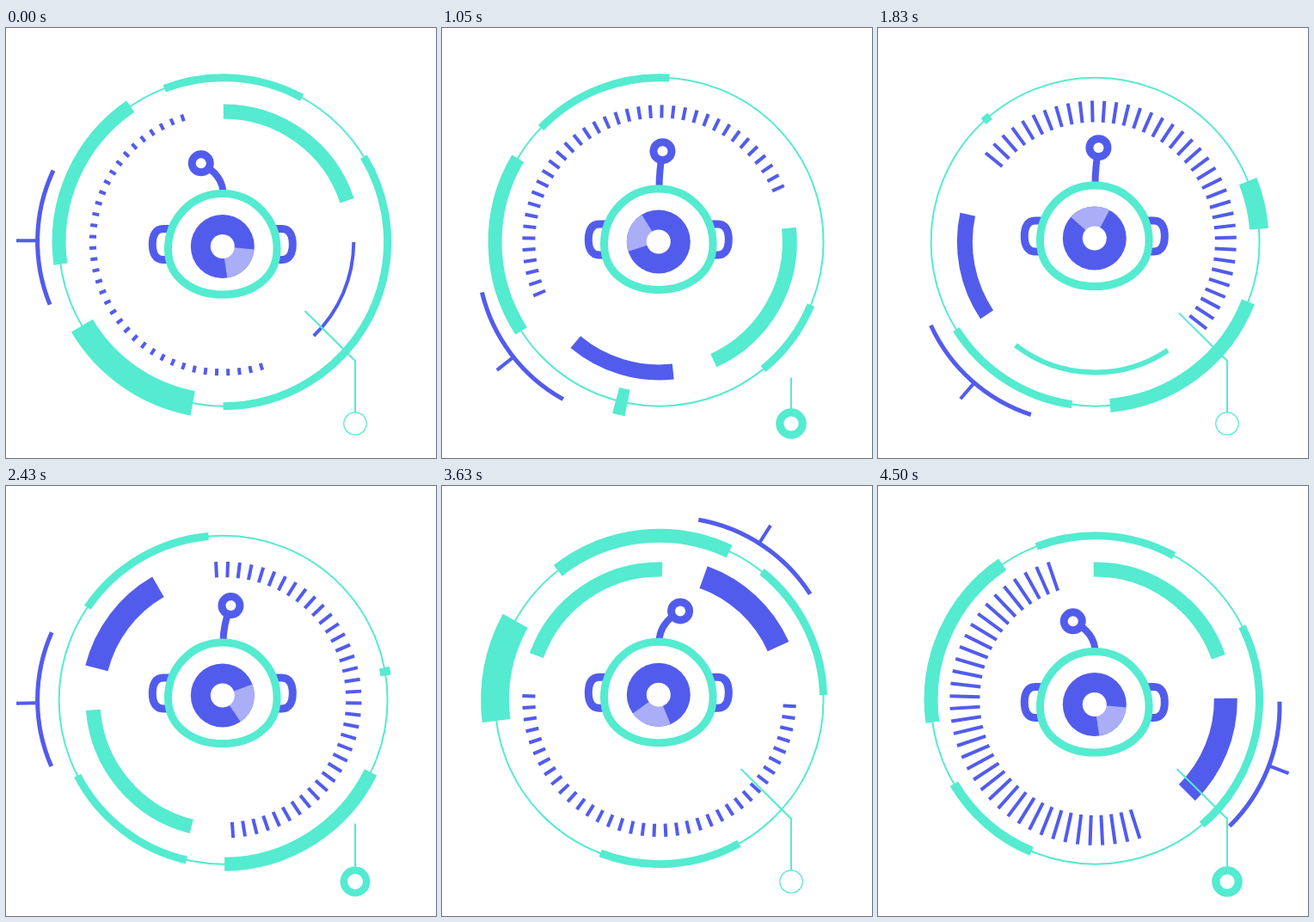
An HTML page with a canvas for the animation above (4.53 s loop, 500 by 500 pixels).

```html
<!DOCTYPE html>
<html lang="en">
<head>
<meta charset="utf-8">
<title>Robot dial</title>
<style>
  html, body { margin: 0; width: 100%; height: 100%; overflow: hidden; background: #fff; }
  canvas { display: block; width: 500px; height: 500px; }
</style>
</head>
<body>
<canvas id="stage" width="500" height="500"></canvas>
<script>
const LOOP = 4530, FULL_TURN = 4510;
const TEAL = '#54ebd0', BLUE = '#525cec', PALE = '#a9aef6';
const CX = 252.6, CY = 248.7, HEAD_X = 251.8;
const RING = 191, DIAL = 151.7, TICKS = 37;
const ctx = document.getElementById('stage').getContext('2d');
const rad = deg => deg * Math.PI / 180;

const smooth = u => u * u * (3 - 2 * u);
// Long rest at both ends, quick change a little after the middle.
const snap = u => u ** 3.3 / (u ** 3.3 + 1.9 * (1 - u) ** 3.3);

const between = (t, t0, t1, a, b) => a + (b - a) * smooth((t - t0) / (t1 - t0));

// Snaps from value to value on an even beat.
const beats = (ms, ...values) => t => {
  const last = values.length - 1;
  const i = Math.min(Math.floor(t / ms), last - 1);
  const u = Math.min(t / ms - i, 1);
  return values[i] + (values[i + 1] - values[i]) * snap(u);
};

// Slow beat: whole-body motion.
const SLOW = 900;
const ringTurn = beats(SLOW, 0, -24.7, -150.8, -145.5, 59.7, 0);
const eyeTurn = beats(SLOW, 43.5, 200, 260, 391, 826, 763.5);
const bob = beats(SLOW, 0, -5.5, -9.5, -10.6, -11.3, 0);
const tealWidth = beats(SLOW, 17, 17, 6, 18, 17, 17);
const blueWidth = beats(SLOW, 4, 18, 18, 28, 27, 27);
const leadLength = beats(SLOW, 143, 40, 139, 45, 143, 143);
const pulse = beats(SLOW, 0, 1, 0, 1, 0, 1);

// Fast beat: trims, ticks and antenna.
const FAST = 750;
const sway = beats(FAST, -38, 6, 4, 13, -10, 37, -38);
const tickLength = beats(FAST, 8, 13.4, 26.7, 18, 37, 15, 35);
const wideWidth = beats(FAST, 29, 32, 24.4, 12, 29, 33, 11);
const wideFrom = beats(FAST, 100.7, 126, 127.7, 135, 113, 113, 112.8);
const wideTo = beats(FAST, 149.3, 127.8, 148.4, 137.4, 149.1, 149.1, 149.3);
const slimFrom = beats(FAST, -31.2, 51.2, 22.2, 0.5, -19.8, 1.4, -26.6);
const slimTo = beats(FAST, 90, 84.5, 13.7, 50.5, 85.5, 51, 49.5);

// The outer pointer swings slowly and is cut halfway through a swing.
function orbitTurn(t) {
  if (t < 1800) return between(t, -1800, 1800, 231.4, 131.6);
  if (t < 3600) return between(t, 1800, 3600, 131.6, 303.5);
  return between(t, 3600, 5400, 303.5, 460);
}

function stroke(color, width) {
  ctx.strokeStyle = color;
  ctx.lineWidth = width;
  ctx.stroke();
}

function arc(r, a, b, color, width, x = 0) {
  ctx.beginPath();
  ctx.arc(x, 0, r, rad(Math.min(a, b)), rad(Math.max(a, b)));
  stroke(color, width);
}

function spoke(deg, r0, r1) {
  const c = Math.cos(rad(deg)), s = Math.sin(rad(deg));
  ctx.beginPath();
  ctx.moveTo(c * r0, s * r0);
  ctx.lineTo(c * r1, s * r1);
  stroke(BLUE, 4);
}

function disc(x, y, r, color) {
  ctx.beginPath();
  ctx.arc(x, y, r, 0, 2 * Math.PI);
  ctx.fillStyle = color;
  ctx.fill();
}

function turned(deg, draw) {
  ctx.save();
  ctx.rotate(rad(deg));
  draw();
  ctx.restore();
}

function drawDials(t) {
  ctx.save();
  ctx.translate(CX, CY);
  arc(RING, 0, 360, TEAL, 2);
  turned(ringTurn(t), () => {
    arc(RING, 249, 298.6, TEAL, 9);
    arc(RING, 172.2, 235.6, TEAL, 16);
    arc(RING, wideFrom(t), wideTo(t), TEAL, wideWidth(t));
    arc(RING, slimFrom(t), slimTo(t), TEAL, 9);
  });
  turned(360 * t / FULL_TURN, () => {
    arc(DIAL, -90, -18.5, TEAL, tealWidth(t));
    arc(DIAL, 0, 46, BLUE, blueWidth(t));
    const half = tickLength(t) / 2;
    for (let i = 0; i < TICKS; i++) spoke(72.9 + i * 4.97, DIAL - half, DIAL + half);
  });
  turned(orbitTurn(t), () => {
    arc(194, -23.7, 23.7, BLUE, 5, 22);
    spoke(-1.1, 216, 240.6);
  });
  ctx.restore();
}

function drawEar(side) {
  ctx.save();
  ctx.scale(side, 1);
  ctx.beginPath();
  ctx.moveTo(61, 233.5);
  ctx.lineTo(69, 233.5);
  ctx.bezierCurveTo(78, 233.5, 81.5, 241, 81.5, 251.5);
  ctx.bezierCurveTo(81.5, 262, 78, 269.5, 69, 269.5);
  ctx.lineTo(61, 269.5);
  stroke(BLUE, 9);
  ctx.restore();
}

function drawAntenna(angle) {
  const x = 0.5 + 41.5 * Math.sin(angle), y = 190 - 41.5 * Math.cos(angle);
  ctx.beginPath();
  ctx.moveTo(0.7, 193);
  ctx.quadraticCurveTo(0.7, 171, x, y);
  stroke(BLUE, 8);
  disc(x, y, 15, BLUE);
  disc(x, y, 6, '#fff');
}

function drawFace() {
  ctx.beginPath();
  ctx.moveTo(0, 192.5);
  ctx.bezierCurveTo(36, 192.5, 63.3, 222, 63.3, 257);
  ctx.bezierCurveTo(63.3, 293, 31, 310, 0, 310);
  ctx.bezierCurveTo(-31, 310, -63.3, 293, -63.3, 257);
  ctx.bezierCurveTo(-63.3, 222, -36, 192.5, 0, 192.5);
  ctx.closePath();
  ctx.fillStyle = '#fff';
  ctx.fill();
  stroke(TEAL, 9);
}

function drawEye(turn) {
  disc(0, 254, 37, BLUE);
  ctx.beginPath();
  ctx.moveTo(0, 254);
  ctx.arc(0, 254, 37, rad(turn - 38), rad(turn + 38));
  ctx.fillStyle = PALE;
  ctx.fill();
  disc(0, 254, 14, '#fff');
}

function drawHead(t) {
  ctx.save();
  ctx.translate(HEAD_X, bob(t));
  drawEar(-1);
  drawEar(1);
  drawAntenna(rad(sway(t)));
  drawFace();
  drawEye(eyeTurn(t));
  ctx.restore();
}

function drawLead(t) {
  ctx.beginPath();
  ctx.moveTo(406, 447);
  ctx.lineTo(406, 387);
  ctx.lineTo(347.5, 329);
  ctx.setLineDash([leadLength(t), 400]);
  stroke(TEAL, 2);
  ctx.setLineDash([]);
  ctx.beginPath();
  ctx.arc(406, 460, 13.2, 0, 2 * Math.PI);
  stroke(TEAL, 1.3 + 7.9 * pulse(t));
}

const start = performance.now();
function frame() {
  const t = (performance.now() - start) % LOOP;
  ctx.fillStyle = '#fff';
  ctx.fillRect(0, 0, 500, 500);
  drawDials(t);
  drawHead(t);
  drawLead(t);
  requestAnimationFrame(frame);
}
frame();
</script>
</body>
</html>
```
